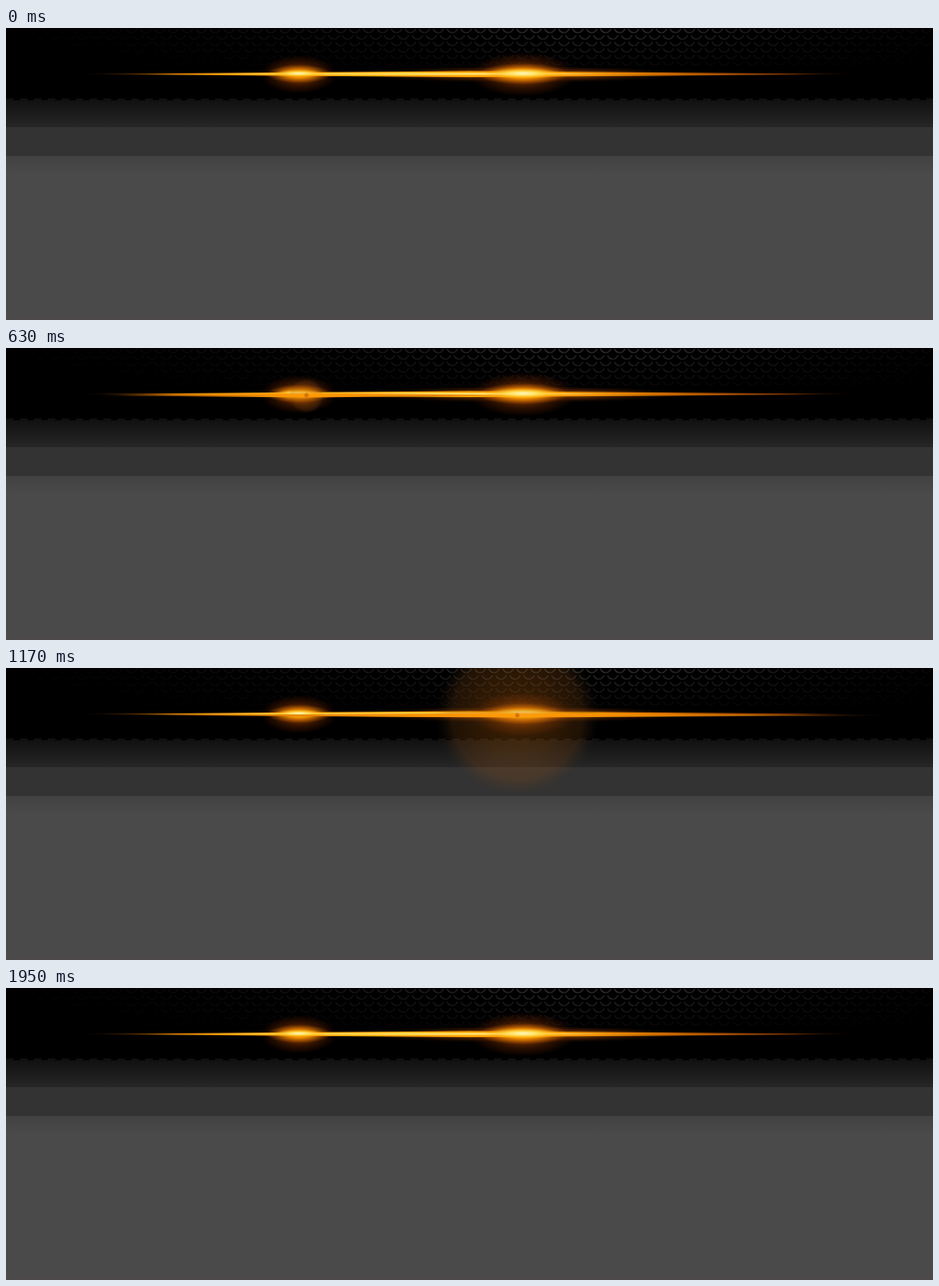
An HTML page with a canvas for the animation above (2340 ms loop, 997 px wide and 315 px high).

```html
<!DOCTYPE html>
<html lang="en">
<head>
<meta charset="utf-8">
<title>Light streak</title>
<style>
html, body { margin: 0; width: 100%; height: 100%; overflow: hidden; background: #4a4a4a; }
canvas { display: block; }
</style>
</head>
<body>
<canvas id="stage" width="997" height="315"></canvas>
<script>
const W = 997, H = 315, LOOP = 2340, STEP = 30;
const ctx = document.getElementById('stage').getContext('2d');
const backdrop = document.createElement('canvas');
backdrop.width = W;
backdrop.height = H;

function fade(g, gradient, stops) {
  stops.forEach(([at, color]) => gradient.addColorStop(at, color));
  g.fillStyle = gradient;
}

function band(g, y0, y1, from, to) {
  fade(g, g.createLinearGradient(0, y0, 0, y1), [[0, from], [1, to]]);
  g.fillRect(0, y0, W, y1 - y0);
}

// Streak that is thickest at xc and tapers to both ends; bend < 0.5 pinches it.
function streak(g, x0, xc, x1, y, h, bend, stops) {
  fade(g, g.createLinearGradient(x0, 0, x1, 0), stops);
  const l = (x0 + xc) / 2, r = (x1 + xc) / 2, b = h * bend;
  g.beginPath();
  g.moveTo(x0, y);
  g.quadraticCurveTo(l, y - b, xc, y - h);
  g.quadraticCurveTo(r, y - b, x1, y);
  g.quadraticCurveTo(r, y + b, xc, y + h);
  g.quadraticCurveTo(l, y + b, x0, y);
  g.fill();
}

function glow(g, x, y, rx, ry, stops) {
  g.save();
  g.translate(x, y);
  g.scale(rx, ry);
  fade(g, g.createRadialGradient(0, 0, 0, 0, 0, 1), stops);
  g.beginPath();
  g.arc(0, 0, 1, 0, 7);
  g.fill();
  g.restore();
}

function mesh(g) {
  g.lineWidth = 1.2;
  for (let row = 0; row < 6; row++) {
    const y = row * 7 - 1;
    for (let x = (row % 2) * 7.5; x < W; x += 15) {
      const light = Math.exp(-(((x - 630) / 210) ** 2));
      const edge = Math.exp(-(((x - 560) / 420) ** 4));
      const a = (0.12 * light + 0.06 * edge + 0.01) * (1 - row / 6.5);
      g.strokeStyle = `rgba(255,255,255,${a})`;
      g.beginPath();
      g.arc(x, y, 6, 0.35, Math.PI - 0.35);
      g.stroke();
    }
  }
  g.fillStyle = '#101010';
  for (let x = 0; x < W; x += 15) g.fillRect(x, 76, 8, 2);
}

// Soft halo with a bright flat core.
function star(g, x, rx, ry) {
  glow(g, x, 50, rx, ry, [
    [0, 'rgba(230,115,0,.9)'], [0.3, 'rgba(190,80,0,.62)'],
    [0.6, 'rgba(120,45,0,.4)'], [0.85, 'rgba(60,18,0,.3)'], [1, 'rgba(30,8,0,0)']
  ]);
  glow(g, x, 49.5, rx * 0.85, ry * 0.48, [
    [0, 'rgba(255,190,30,1)'], [0.4, 'rgba(255,160,0,.8)'], [1, 'rgba(210,100,0,0)']
  ]);
}

function paintBackdrop(g) {
  g.fillStyle = '#000';
  g.fillRect(0, 0, W, H);
  mesh(g);
  band(g, 78, 107, '#111', '#262626');
  band(g, 107, 138, '#333', '#333');
  band(g, 138, 155, '#424242', '#494949');
  band(g, 155, H, '#4a4a4a', '#4a4a4a');
  g.fillStyle = '#514849';
  g.fillRect(0, 314, W, 1);

  glow(g, 556, 50, 175, 9, [
    [0, 'rgba(220,110,0,.8)'], [0.5, 'rgba(170,75,0,.5)'], [1, 'rgba(80,30,0,0)']
  ]);
  star(g, 315, 42, 21);
  star(g, 556, 58, 24);

  g.filter = 'blur(0.7px)';
  streak(g, 82, 500, 914, 49.8, 3.2, 0.62, [
    [0, 'rgba(110,45,0,.3)'], [0.12, '#c87300'], [0.28, '#ffa500'],
    [0.6, '#ffa800'], [0.75, '#cc6900'], [0.92, '#7a3200'], [1, 'rgba(80,25,0,.2)']
  ]);
  g.filter = 'none';
  streak(g, 140, 430, 720, 49.5, 1.2, 0.65, [
    [0, 'rgba(255,190,30,0)'], [0.25, '#ffd14a'], [0.5, '#ffdf60'],
    [0.72, '#fff0a0'], [1, 'rgba(255,160,20,0)']
  ]);
  for (const [x, w] of [[315, 28], [556, 42]]) {
    glow(g, x, 49, w, w / 7, [
      [0, '#fff8c8'], [0.4, 'rgba(255,225,90,.9)'], [1, 'rgba(255,160,0,0)']
    ]);
  }
}

// Linear interpolation through [time, value] pairs.
function track(keys, t) {
  const i = keys.findIndex(k => k[0] >= t);
  if (i === 0) return keys[0][1];
  if (i < 0) return keys[keys.length - 1][1];
  const [t0, a] = keys[i - 1], [t1, b] = keys[i];
  return a + (b - a) * (t - t0) / (t1 - t0);
}

const REACH = [[60, 970], [480, 380], [585, 215], [870, 318], [1140, 406], [1680, 410], [1920, 640]];
const RADIUS = [[60, 45], [300, 44], [480, 29], [600, 19], [870, 21], [1050, 40],
  [1110, 56], [1170, 88], [1230, 70], [1350, 45], [1650, 12]];
const ALPHA = [[60, 0.35], [210, 0.95], [1170, 0.95], [1350, 0.78], [1710, 0.4], [1950, 0.12]];

// Fast entry, slow middle, fast exit.
function flareX(t) {
  const a = t - 480, b = t - 870, c = t - 1170;
  return 253 + a * (0.41 + b * (6.8e-5 + c * 5.7e-7));
}

function paintFlare(t) {
  const x = flareX(t), reach = track(REACH, t), r = track(RADIUS, t);

  glow(ctx, x, 51.5, r, r, [
    [0, 'rgba(190,100,10,.32)'], [0.5, 'rgba(165,88,15,.27)'],
    [0.8, 'rgba(130,72,20,.24)'], [1, 'rgba(60,45,30,0)']
  ]);

  ctx.globalAlpha = track(ALPHA, t);
  streak(ctx, x - reach, x, x + reach, 51, 2.5, 0.55, [
    [0, 'rgba(180,85,0,0)'], [0.1, 'rgba(205,105,0,.6)'], [0.3, 'rgba(240,135,0,.92)'],
    [0.5, '#ff9c08'], [0.7, 'rgba(240,135,0,.92)'], [0.9, 'rgba(205,105,0,.6)'],
    [1, 'rgba(180,85,0,0)']
  ]);
  glow(ctx, x, 51, 3, 3, [[0, '#c56a08'], [0.7, '#d87a08'], [1, 'rgba(230,130,0,0)']]);
  ctx.globalAlpha = 1;
}

function render(now) {
  const t = Math.floor((now % LOOP) / STEP) * STEP;
  ctx.drawImage(backdrop, 0, 0);
  if (t >= 60 && t < 1950) paintFlare(t);
}

paintBackdrop(backdrop.getContext('2d'));
const start = performance.now();
function tick() {
  render(performance.now() - start);
  requestAnimationFrame(tick);
}
tick();
</script>
</body>
</html>
```
